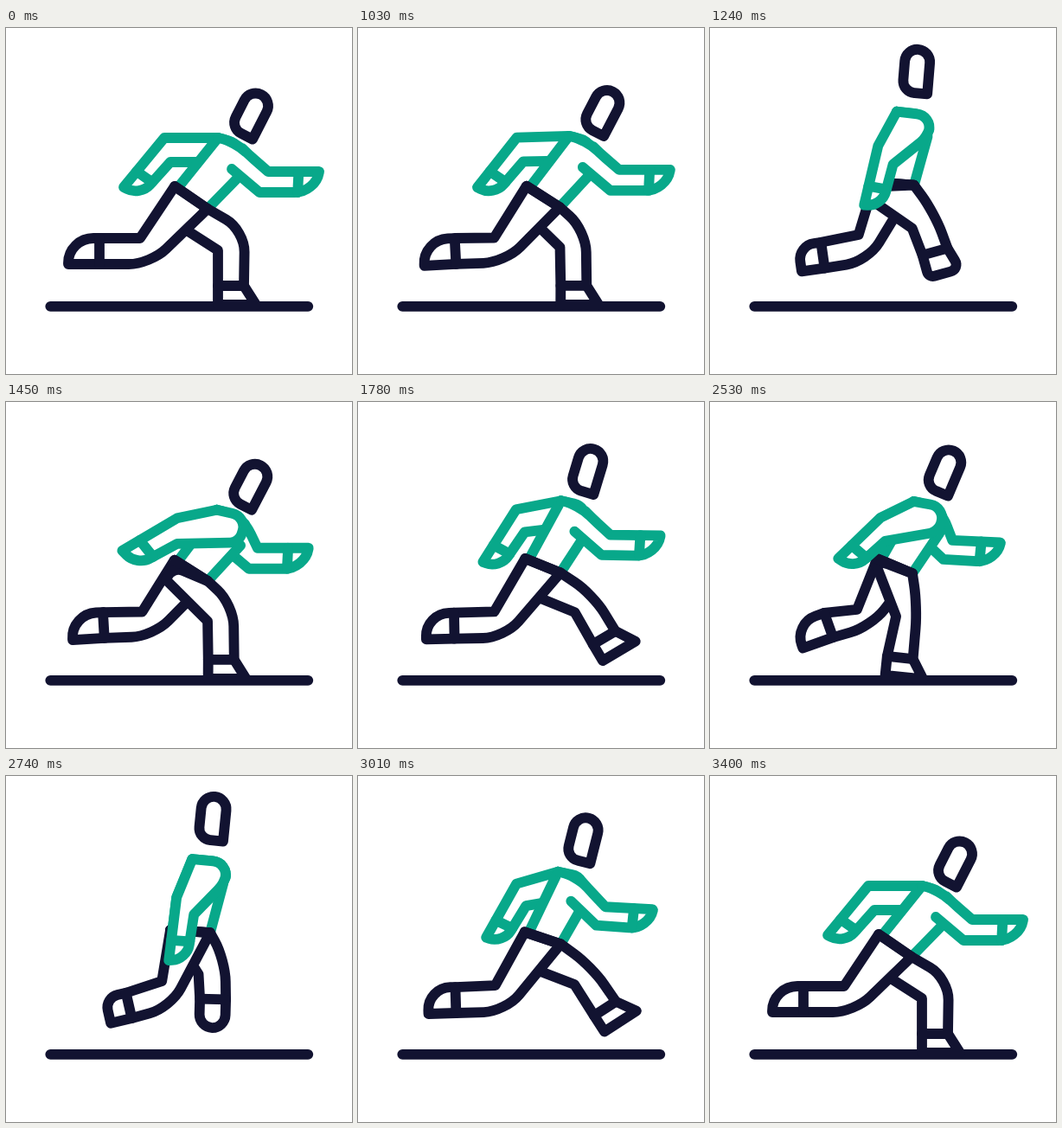
Write an HTML page with a canvas that moves like this. It is 400x400 px and loops after 3430 ms.

```html
<!DOCTYPE html>
<html lang="en">
<head>
<meta charset="utf-8">
<title>Runner</title>
<style>
  html, body { margin: 0; width: 100%; height: 100%; overflow: hidden; background: #fff; }
  canvas { display: block; width: 400px; height: 400px; }
</style>
</head>
<body>
<canvas id="stage"></canvas>
<script>
const DARK = '#121331', GREEN = '#08a88a';
const LOOP = 3430, REST = 1000, RUN = 2400, STEP = 30, STRIDES = 4;
const { PI, sin, cos, max, min, floor, hypot } = Math;

const canvas = document.getElementById('stage');
const ctx = canvas.getContext('2d');
const ratio = window.devicePixelRatio || 1;
canvas.width = canvas.height = 400 * ratio;

// Body at the moment of landing and at the top of a stride.
const LANDING = { shoulder: [245, 127], hipBack: [195, 183], hipFront: [233, 209], chest: [27, 42], head: [288.5, 90] };
const PASSING = { shoulder: [215, 96], hipBack: [190, 178], hipFront: [236, 181], chest: [36, 28], head: [239.7, 38] };

// One leg's cycle: in front, pushing off, trailing, swinging through.
const LAND = { knee: [245, 257], shin: [276, 234], ankle: [260, 298], angle: 0 };
const PUSH = { knee: [180, 237], shin: [190, 268], ankle: [141.5, 265], angle: 78 };
const TRAIL = { knee: [155, 243], shin: [167, 273], ankle: [108, 258], angle: 90 };
const SWING = { knee: [223, 229], shin: [254, 212], ankle: [240, 258], angle: 1 };

// Arm outlines from the shoulder: armpit, elbow, hand, hand, inner elbow, chest, shoulder cap.
const HANG = [[0, 0], [-18, 44], [-27, 117], [-6, 116], [2, 64], [37, 28], [42, 4]];
const FRONT = [[16, 36], [48, 63], [113, 63], [117, 39], [58, 39], [35, 19], [20, 4]];
const BACK = [[0, 0], [-47, 8], [-113, 44], [-96, 62], [-48, 38], [25, 38], [35, 8]];
const FAR_FRONT = FRONT.map(([x, y], i) => i < 5 ? [x - 11, y + 5] : [x, y]);
const FAR_BACK = [[0, 0], [-62, 0], [-109, 57], [-90, 67], [-55, 28], [24, 28], [30, 8]];

const clamp = v => max(0, min(1, v));
const lerp = (a, b, k) => a + (b - a) * k;
const mix = (a, b, kx, ky = kx) => [lerp(a[0], b[0], kx), lerp(a[1], b[1], ky)];
const add = (a, b) => [a[0] + b[0], a[1] + b[1]];
const round = (p, r) => [p[0], p[1], r];
const wrap = (v, n) => ((v % n) + n) % n;
const smooth = v => v * v * (3 - 2 * v);

// polyline whose corners may be rounded by a cut length
function trace(points, closed) {
  ctx.beginPath();
  points.forEach((p, i) => {
    const r = p[2] || 0;
    if (!i) return ctx.moveTo(p[0], p[1]);
    if (r < .5) return ctx.lineTo(p[0], p[1]);
    const toward = q => mix(p, q, min(r / (hypot(q[0] - p[0], q[1] - p[1]) || 1), .95));
    const a = toward(points[i - 1]), b = toward(points[(i + 1) % points.length]);
    ctx.lineTo(...a);
    ctx.bezierCurveTo(...mix(p, a, .45), ...mix(p, b, .45), ...b);
  });
  if (closed) ctx.closePath();
}

function draw(points, color, { closed = false, filled = false } = {}) {
  trace(points, closed);
  if (filled) ctx.fill();
  ctx.strokeStyle = color;
  ctx.stroke();
}

function bodyPose(strides) {
  const q = wrap(strides, 1);
  const lift = sin(PI * q ** 1.08) ** 1.6;
  const lean = lift ** 1.2;
  const sway = 3 * sin(2 * PI * q);
  const part = name => mix(LANDING[name], PASSING[name], lean, lift);
  return {
    shoulder: part('shoulder'),
    hipBack: part('hipBack'),
    hipFront: part('hipFront'),
    chest: add(part('shoulder'), part('chest')),
    head: add(part('head'), [sway, 0]),
    tilt: lerp(27, 5.5, lean) + sway
  };
}

function blendLeg(a, b, k) {
  return {
    knee: mix(a.knee, b.knee, k),
    shin: mix(a.shin, b.shin, k),
    ankle: mix(a.ankle, b.ankle, k),
    angle: lerp(a.angle, b.angle, k)
  };
}

function legPose(phase) {
  const u = (phase % .5) * 2;
  if (phase < .5) {
    // the foot slides back flat and only then rolls off the ground
    const roll = u ** 3;
    return {
      knee: mix(LAND.knee, PUSH.knee, u ** .9),
      shin: mix(LAND.shin, PUSH.shin, u, roll),
      ankle: mix(LAND.ankle, PUSH.ankle, u ** 1.25, roll),
      angle: lerp(LAND.angle, PUSH.angle, roll)
    };
  }
  if (phase < 1) return blendLeg(PUSH, TRAIL, 1 - (1 - u) ** 2.3);
  if (phase < 1.5) return blendLeg(TRAIL, SWING, u ** 1.75);
  const pose = blendLeg(SWING, LAND, u), reach = sin(PI * u);
  return {
    knee: add(pose.knee, [15 * reach, -4 * reach]),
    shin: add(pose.shin, [4 * reach, -4 * reach]),
    ankle: add(pose.ankle, [35 * reach, -12 * reach]),
    angle: pose.angle - 34 * reach
  };
}

function drawLeg(strides, { hipBack, hipFront }) {
  const phase = wrap(strides, 2);
  const { knee, shin, ankle, angle } = legPose(phase);
  const c = cos(angle * PI / 180), s = sin(angle * PI / 180);
  const foot = (x, y) => add(ankle, [x * c - y * s, x * s + y * c]);

  const ahead = cos(PI * phase), side = sin(PI * phase), behind = max(0, -ahead);
  const flat = clamp(2.2 * ahead);
  const sole = lerp(29 - 4 * side + 7 * behind, 22, flat);
  const heelRound = (1 - flat) * (15 + 14 * behind);
  const toeRound = 15 * max(0, -side) ** 8;
  const sinceLanding = phase < 1 ? phase : phase - 2;
  const drop = flat * clamp(1 - 4 * sinceLanding);
  const thigh = add(hipBack, [-14 * drop, 33 * drop]);

  const cuff = [foot(-15, 0), foot(15, 0)];
  draw([
    thigh, knee, cuff[0],
    round(foot(-15, sole), heelRound),
    round(foot(15 + 14 * flat, sole), toeRound),
    cuff[1], round(shin, 25), hipFront,
    round(mix(hipBack, thigh, .3), 14)
  ], DARK, { closed: true, filled: true });
  draw(cuff, DARK);
}

function drawArm(strides, shoulder, front, back) {
  const swing = cos(PI * strides);
  const forward = smooth(clamp(1.1 * swing));
  const backward = max(0, -swing) ** 1.5;
  const [pit, elbow, handBack, handFront, inner, chest, cap] = HANG.map((p, i) =>
    add(shoulder, mix(mix(p, front[i], forward), back[i], backward)));
  draw([
    pit, elbow, round(handBack, 24 * forward),
    round(handFront, 17 * (1 - forward)), inner,
    round(chest, 10), round(cap, 18), shoulder
  ], GREEN, { filled: true });
  draw([mix(elbow, handBack, .68), mix(inner, handFront, .6)], GREEN);
}

function drawHead([x, y], tilt) {
  ctx.save();
  ctx.translate(x, y);
  ctx.rotate(tilt * PI / 180);
  ctx.beginPath();
  ctx.arc(0, 0, 14.5, PI, 0);
  ctx.lineTo(14.5, 36);
  ctx.lineTo(0, 36);
  ctx.arcTo(-14.5, 36, -14.5, 22, 14);
  ctx.closePath();
  ctx.strokeStyle = DARK;
  ctx.stroke();
  ctx.restore();
}

function render(strides) {
  ctx.setTransform(ratio, 0, 0, ratio, 0, 0);
  ctx.fillStyle = '#fff';
  ctx.fillRect(0, 0, 400, 400);
  ctx.lineWidth = 11.8;
  ctx.lineCap = ctx.lineJoin = 'round';

  const body = bodyPose(strides);
  const { shoulder, hipBack, hipFront, chest } = body;
  const waist = add(hipBack, [5, 0]);

  draw([[51.3, 321.8], [349.3, 321.8]], DARK);
  drawArm(strides + 1, shoulder, FAR_FRONT, FAR_BACK);
  trace([shoulder, waist, hipFront, chest], true);
  ctx.fill();
  draw([shoulder, waist], GREEN);
  draw([hipFront, chest], GREEN);
  drawLeg(strides, body);
  drawLeg(strides + 1, body);
  draw([hipBack, hipFront], DARK);
  drawArm(strides, shoulder, FRONT, BACK);
  drawHead(body.head, body.tilt);
}

// The run starts at full speed and slows into its last landing.
function stridesAt(time) {
  const stepped = STEP * floor((time - REST - 10) / STEP + 1 / 3);
  const u = clamp(stepped / RUN);
  return STRIDES * (u + u * (1 - u) * (.46 + .4 * u));
}

let origin;
function tick(now) {
  if (origin === undefined) origin = now;
  render(stridesAt((now - origin) % LOOP));
  requestAnimationFrame(tick);
}
render(0);
requestAnimationFrame(tick);
</script>
</body>
</html>
```
